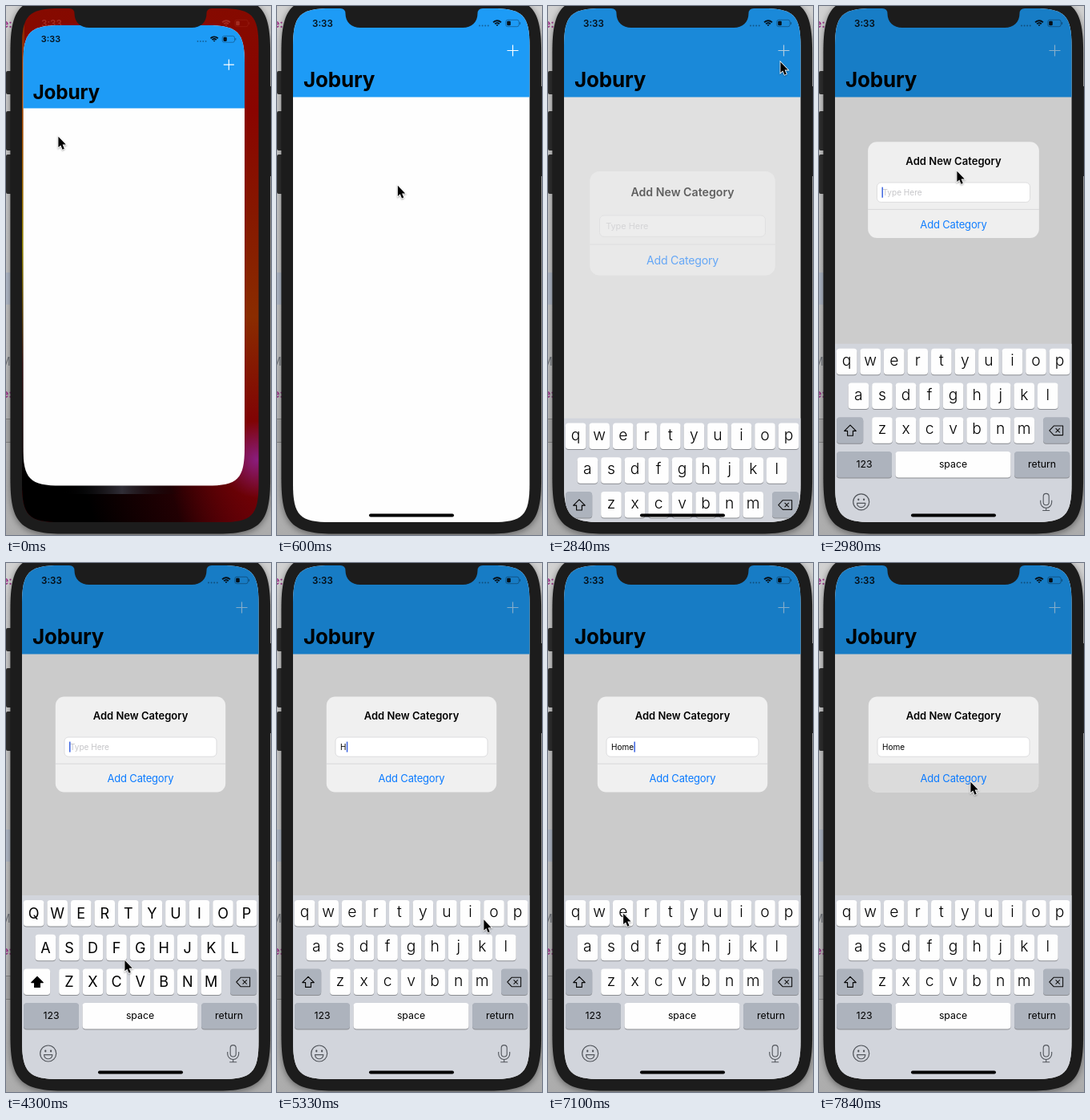
Write an HTML page with a canvas that moves like this. It is 331 px wide and 659 px high and loops after 7.99 s.

```html
<!DOCTYPE html>
<html lang="en">
<head>
<meta charset="utf-8">
<title>Add a category</title>
<style>
html, body { margin: 0; width: 100%; height: 100%; overflow: hidden; background: #c4c4c4; }
canvas { display: block; width: 331px; height: 659px; }
</style>
</head>
<body>
<canvas id="stage"></canvas>
<script>
const W = 331, H = 659, LOOP = 7990, STEP = 148, LAST = 53;
const SCREEN = { x: 20, y: 3, w: 295.5, h: 640 };
const ICON = { x: 21.4, y: 24, w: 276.6, h: 573.5 }; // app window as it opens
const RADIUS = 31, BEZEL = 14.6, MID = 168;
const FONT = 'Inter, "Liberation Sans", sans-serif';
const LEFT = { align: 'left' };

const ROWS = ['qwertyuiop', 'asdfghjkl', 'zxcvbnm'];
const PITCH = 29.55, KEY_W = 25.6, KEY_H = 32.5;
const WORD = 'Home', FIRST_PRESS = 34, PRESS_GAP = 4;
const ALERT_AT = 18, SHIFT_AT = 27;

const rowY = row => 420 + 42.7 * row;
const keyX = (row, i) => MID - .4 + (i - (ROWS[row].length - 1) / 2) * PITCH;
function keySpot(letter) {
  const row = ROWS.findIndex(r => r.includes(letter));
  return [keyX(row, ROWS[row].indexOf(letter)), rowY(row) + 16];
}

// Pointer stops: tick, x, y
const STOPS = [
  [0, 65, 162], [5, 152, 224], [9, 196, 147], [12, 296, 55], [19, 290, 69],
  [20, 172, 205], [26, 38, 529], [34, ...keySpot('h')], [38, ...keySpot('o')],
  [40, 266, 544], [42, 267, 523], [48, ...keySpot('e')], [53, 189, 272]
];

const canvas = document.getElementById('stage');
const dpr = window.devicePixelRatio || 1;
canvas.width = W * dpr;
canvas.height = H * dpr;
const c = canvas.getContext('2d');

const mix = (a, b, p) => a + (b - a) * p;
const clamp = v => Math.min(1, Math.max(0, v));
const easeOut = (u, power) => 1 - (1 - clamp(u)) ** power;
const easeInOut = u => (1 - Math.cos(Math.PI * clamp(u))) / 2;

function rect(x, y, w, h, fill) {
  c.fillStyle = fill;
  c.fillRect(x, y, w, h);
}

function round(x, y, w, h, r, fill) {
  c.beginPath();
  c.roundRect(x, y, w, h, r);
  c.fillStyle = fill;
  c.fill();
}

// Rounded box whose corners ease into the sides.
function squircle({ x, y, w, h }, r) {
  const e = 1.528 * r, k = .272 * r, x2 = x + w, y2 = y + h;
  c.beginPath();
  c.moveTo(x + e, y);
  c.lineTo(x2 - e, y);
  c.bezierCurveTo(x2 - k, y, x2, y + k, x2, y + e);
  c.lineTo(x2, y2 - e);
  c.bezierCurveTo(x2, y2 - k, x2 - k, y2, x2 - e, y2);
  c.lineTo(x + e, y2);
  c.bezierCurveTo(x + k, y2, x, y2 - k, x, y2 - e);
  c.lineTo(x, y + e);
  c.bezierCurveTo(x, y + k, x + k, y, x + e, y);
  c.closePath();
}

function path(points, closed) {
  c.beginPath();
  points.forEach(([x, y]) => c.lineTo(x, y));
  if (closed) c.closePath();
}

function cross(x, y, dx, dy, color, width) {
  c.beginPath();
  c.moveTo(x - dx, y - dy);
  c.lineTo(x + dx, y + dy);
  c.moveTo(x + dy, y - dx);
  c.lineTo(x - dy, y + dx);
  stroke(color, width);
}

function stroke(color, width) {
  c.strokeStyle = color;
  c.lineWidth = width;
  c.stroke();
}

function text(str, x, y, size, color, { weight = 400, align = 'center', gap = 0 } = {}) {
  c.font = `${weight} ${size}px ${FONT}`;
  c.letterSpacing = gap + 'px';
  c.textAlign = align;
  c.fillStyle = color;
  c.fillText(str, x, y);
}

// Evenly spaced colours along a line.
function gradient(x0, y0, x1, y1, ...colors) {
  const g = c.createLinearGradient(x0, y0, x1, y1);
  colors.forEach((color, i) => g.addColorStop(i / (colors.length - 1), color));
  return g;
}

function desktop() {
  rect(0, 0, W, H, gradient(0, 0, 0, H, '#d2d2d2', '#cbcbcb', '#c2c2c2', '#acacac'));
  rect(0, 332, 8, 40, '#b3bccb');
  rect(0, 514, 8, 30, '#858585');
  rect(0, 515, 8, 28, '#adadad');
  text('e:', -5, 27, 14, '#9c2d88', { weight: 600, align: 'left' });
  text('M', -7, 448, 14, '#73777d', LEFT);
  text('e:', -5, 488, 14, '#9c2d88', { weight: 600, align: 'left' });
}

function phone() {
  round(0, 81, 8, 29, 2, '#303030');
  round(0, 131, 8, 49, 2, '#303030');
  round(0, 185, 8, 49, 2, '#303030');
  rect(328, 100, 3, 112, '#303030');
  c.save();
  c.shadowColor = 'rgba(0,0,0,.45)';
  c.shadowBlur = 8 * dpr;
  c.shadowOffsetY = 2 * dpr;
  const { x, y, w, h } = SCREEN;
  squircle({ x: x - BEZEL, y: y - BEZEL, w: w + 2 * BEZEL, h: h + 2 * BEZEL }, RADIUS + BEZEL);
  c.fillStyle = '#1c1c1c';
  c.fill();
  c.restore();
}

function notch() {
  c.beginPath();
  c.moveTo(79, 1);
  c.lineTo(79, 3);
  c.quadraticCurveTo(85.5, 3.2, 85.5, 9.5);
  c.bezierCurveTo(85.5, 20, 93, 27, 104, 27);
  c.lineTo(232, 27);
  c.bezierCurveTo(243, 27, 250.5, 20, 250.5, 9.5);
  c.quadraticCurveTo(250.5, 3.2, 257, 3);
  c.lineTo(257, 1);
  c.fillStyle = '#1c1c1c';
  c.fill();
}

function wallpaper() {
  rect(20, 3, 296, 640, gradient(0, 3, 0, 643,
    '#850a00', '#8a0400', '#861800', '#8a2c00', '#800404', '#6a0006'));
  const purple = c.createRadialGradient(314, 565, 0, 314, 565, 48);
  purple.addColorStop(0, 'rgba(140,32,140,.9)');
  purple.addColorStop(1, 'rgba(140,32,140,0)');
  rect(266, 517, 50, 96, purple);
  rect(20, 560, 296, 83, gradient(110, 643, 310, 590, '#000', 'rgba(20,0,2,.85)', 'rgba(90,0,6,0)'));
  rect(20, 3, 3, 590, gradient(0, 3, 0, 593, '#8a2600', '#a04800', '#908000', '#301010', '#000'));
  rect(70, 596, 150, 12, gradient(70, 0, 220, 0, '#0000', 'rgba(70,76,90,.6)', '#0000'));
  statusBar('rgba(255,150,130,.25)');
}

function statusBar(color) {
  text('3:33', 44, 25.6, 11.6, color, { weight: 600, align: 'left' });
  c.save();
  c.globalAlpha *= .4;
  for (let i = 0; i < 4; i++) round(252 + i * 3.6, 23.4, 2, 2, 1, color);
  c.beginPath();
  c.roundRect(285.8, 17.3, 16.4, 8.4, 2.4);
  stroke(color, .9);
  round(303, 20, 1.1, 3, .5, color);
  c.restore();
  round(287.2, 18.7, 4.6, 5.6, 1.2, color);
  for (let i = 0; i < 3; i++) {
    c.beginPath();
    c.arc(275, 25, 1 + 2.85 * i, -Math.PI * .76, -Math.PI * .24);
    stroke(color, 1.9);
  }
}

function app(shown, barAlpha) {
  rect(20, 3, 296, 640, '#fefefe');
  rect(20, 3, 296, 110.5, '#1d9bf6');
  statusBar('#06121c');
  cross(294.5, 55.5, 7, 0, `rgba(255,255,255,${1 - .4 * shown})`, 1.2);
  text('Jobury', 33, 101, 26, '#000', { weight: 700, align: 'left', gap: -.2 });
  c.globalAlpha = barAlpha;
  homeBar();
  c.globalAlpha = 1;
}

function homeBar() {
  round(115, 632.6, 106, 3.9, 2, '#000');
}

function alertCard(n, shown, drop, entry) {
  const scale = 1 + .22 * (1 - shown);
  c.save();
  c.globalAlpha = shown;
  c.translate(MID, 226 + drop * .45);
  c.scale(scale, scale);
  c.translate(-MID, -226);
  round(61.8, 166.5, 212.4, 119, 11, '#f0f0f0');
  if (n === LAST) round(61.8, 250, 212.4, 35.5, [0, 0, 11, 11], '#dbdbdb');
  rect(61.8, 249.7, 212.4, .8, '#d2d2d3');
  text('Add New Category', MID, 194.8, 13, '#000', { weight: 600 });
  text('Add Category', MID, 273.2, 13, '#0a7aff', { gap: -.2 });
  round(73, 217, 190, 24.2, 5, shown < .9 ? '#f0f0f0' : '#fff');
  c.beginPath();
  c.roundRect(73, 217, 190, 24.2, 5);
  stroke('#d6d6d8', .8);
  text(entry || 'Type Here', entry ? 79 : 80, 232.8, 10, entry ? '#000' : '#c4c4c7', LEFT);
  if (n >= 20 && (n - 20) % 7 < 4) {
    const x = entry ? 79.4 + c.measureText(entry).width : 79;
    rect(x, 222.6, 1.5, 13, '#3a62e0');
  }
  c.restore();
}

function key(x, y, w, fill) {
  round(x, y + 1, w, KEY_H, 4, '#8b8d92');
  round(x, y, w, KEY_H, 4, fill);
}

function shiftIcon(filled) {
  path([[39, 515.3], [46.3, 522.6], [42.4, 522.6], [42.4, 528.4],
    [35.6, 528.4], [35.6, 522.6], [31.7, 522.6]], true);
  c.lineJoin = 'round';
  c.fillStyle = '#000';
  if (filled) c.fill();
  stroke('#000', 1.1);
}

function deleteIcon() {
  path([[287.8, 522], [293.3, 516.2], [304.6, 516.2], [304.6, 527.8], [293.3, 527.8]], true);
  stroke('#111', 1.1);
  cross(298.2, 522, 2.6, 2.6, '#111', 1.1);
}

function smiley(ink) {
  c.beginPath();
  c.arc(52.7, 611, 10, 0, 7);
  stroke(ink, 1.2);
  round(48.2, 606.6, 2.2, 2.8, 1.1, ink);
  round(55, 606.6, 2.2, 2.8, 1.1, ink);
  c.beginPath();
  c.arc(52.7, 612.6, 5.2, 0, Math.PI);
  c.closePath();
  stroke(ink, 1.1);
}

function mic(ink) {
  c.beginPath();
  c.roundRect(280.2, 600.6, 7, 14.4, 3.5);
  c.moveTo(276.7, 609);
  c.lineTo(276.7, 611.5);
  c.arc(283.7, 611.5, 7, Math.PI, 0, true);
  c.lineTo(290.7, 609);
  c.moveTo(283.7, 618.5);
  c.lineTo(283.7, 621.7);
  c.moveTo(279.2, 621.7);
  c.lineTo(288.2, 621.7);
  stroke(ink, 1.1);
}

function popup(letter, x, y) {
  const top = y - 51.5, l = x - 23.3, r = x + 23.3, kl = x - KEY_W / 2, kr = x + KEY_W / 2;
  c.save();
  c.shadowColor = 'rgba(0,0,0,.35)';
  c.shadowBlur = 3 * dpr;
  c.beginPath();
  c.moveTo(l + 9, top);
  c.arcTo(r, top, r, top + 9, 9);
  c.lineTo(r, top + 33);
  c.bezierCurveTo(r, top + 43, kr, top + 42, kr, top + 53);
  c.arcTo(kr, y + KEY_H, kr - 4, y + KEY_H, 4);
  c.arcTo(kl, y + KEY_H, kl, y + KEY_H - 4, 4);
  c.lineTo(kl, top + 53);
  c.bezierCurveTo(kl, top + 42, l, top + 43, l, top + 33);
  c.arcTo(l, top, l + 9, top, 9);
  c.fillStyle = '#fdfdfd';
  c.fill();
  c.restore();
  text(letter, x, top + 32, 28, '#000', { weight: 350 });
}

function keyboard(n, drop) {
  const upper = n >= SHIFT_AT && n <= FIRST_PRESS;
  const pressed = WORD[(n - FIRST_PRESS) / PRESS_GAP];
  const white = '#fefefe', grey = '#adb3bd', ink = '#52565c';
  let held = null;
  c.save();
  c.translate(0, drop);
  rect(20, 414, 296, 245, '#d2d5dc');
  ROWS.forEach((letters, row) => [...letters].forEach((letter, i) => {
    const x = keyX(row, i), y = rowY(row), label = upper ? letter.toUpperCase() : letter;
    key(x - KEY_W / 2, y, KEY_W, white);
    if (upper) text(label, x, y + 23, 18, '#000');
    else text(label, x, y + 21.2, 19.3, '#000', { weight: 350 });
    if (label === pressed) held = [label, x, y];
  }));
  key(22, rowY(2), 33.2, upper ? white : grey);
  shiftIcon(upper);
  key(280, rowY(2), 33.2, grey);
  deleteIcon();
  key(22, rowY(3), 69, grey);
  key(95.5, rowY(3), 144, white);
  key(244, rowY(3), 69.2, grey);
  text('123', 56.6, 568.4, 12.3, '#000');
  text('space', 167.5, 567.8, 12.3, '#000');
  text('return', 278.6, 567.8, 12.3, '#000');
  smiley(ink);
  mic(ink);
  if (held) popup(...held);
  c.restore();
}

function pointer(n) {
  const i = Math.max(1, STOPS.findIndex(s => s[0] >= n));
  const [t0, x0, y0] = STOPS[i - 1], [t1, x1, y1] = STOPS[i];
  const p = easeOut((n - t0) / (t1 - t0), 2.5);
  c.save();
  c.translate(mix(x0, x1, p) + .4, mix(y0, y1, p) + .8);
  c.scale(.9, .9);
  c.shadowColor = 'rgba(0,0,0,.35)';
  c.shadowBlur = 2 * dpr;
  c.shadowOffsetY = dpr;
  path([[0, 0], [0, 14.8], [3.3, 11.8], [5.7, 17.6], [8.2, 16.5], [5.8, 10.9], [10.4, 10.9]], true);
  c.lineJoin = 'miter';
  stroke('#fff', 1.8);
  c.shadowColor = 'transparent';
  c.fillStyle = '#000';
  c.fill();
  c.restore();
}

function draw(n) {
  const open = easeOut(n / 4, 4);
  const shown = easeInOut((n - ALERT_AT + .68) / 3);
  const drop = 245 * (1 - shown);
  const typed = WORD.slice(0, Math.max(0, Math.ceil((n - FIRST_PRESS) / PRESS_GAP)));

  c.setTransform(dpr, 0, 0, dpr, 0, 0);
  desktop();
  phone();
  c.save();
  squircle(SCREEN, RADIUS);
  c.clip();

  c.save();
  if (open < 1) {
    wallpaper();
    const box = {};
    for (const k in ICON) box[k] = mix(ICON[k], SCREEN[k], open);
    squircle(box, RADIUS);
    c.clip();
    c.translate(box.x, box.y);
    c.scale(box.w / SCREEN.w, box.w / SCREEN.w);
    c.translate(-SCREEN.x, -SCREEN.y);
  }
  app(shown, open);
  c.restore();

  if (n >= ALERT_AT) {
    rect(20, 3, 296, 640, `rgba(0,0,0,${.2 * shown})`);
    alertCard(n, shown, drop, typed);
    keyboard(n, drop);
    homeBar();
  }
  c.restore();
  notch();
  pointer(n);
}

const start = performance.now();
function frame() {
  const t = (performance.now() - start) % LOOP;
  draw(Math.min(LAST, Math.floor((t + 8) / STEP)));
  requestAnimationFrame(frame);
}
frame();
</script>
</body>
</html>
```
